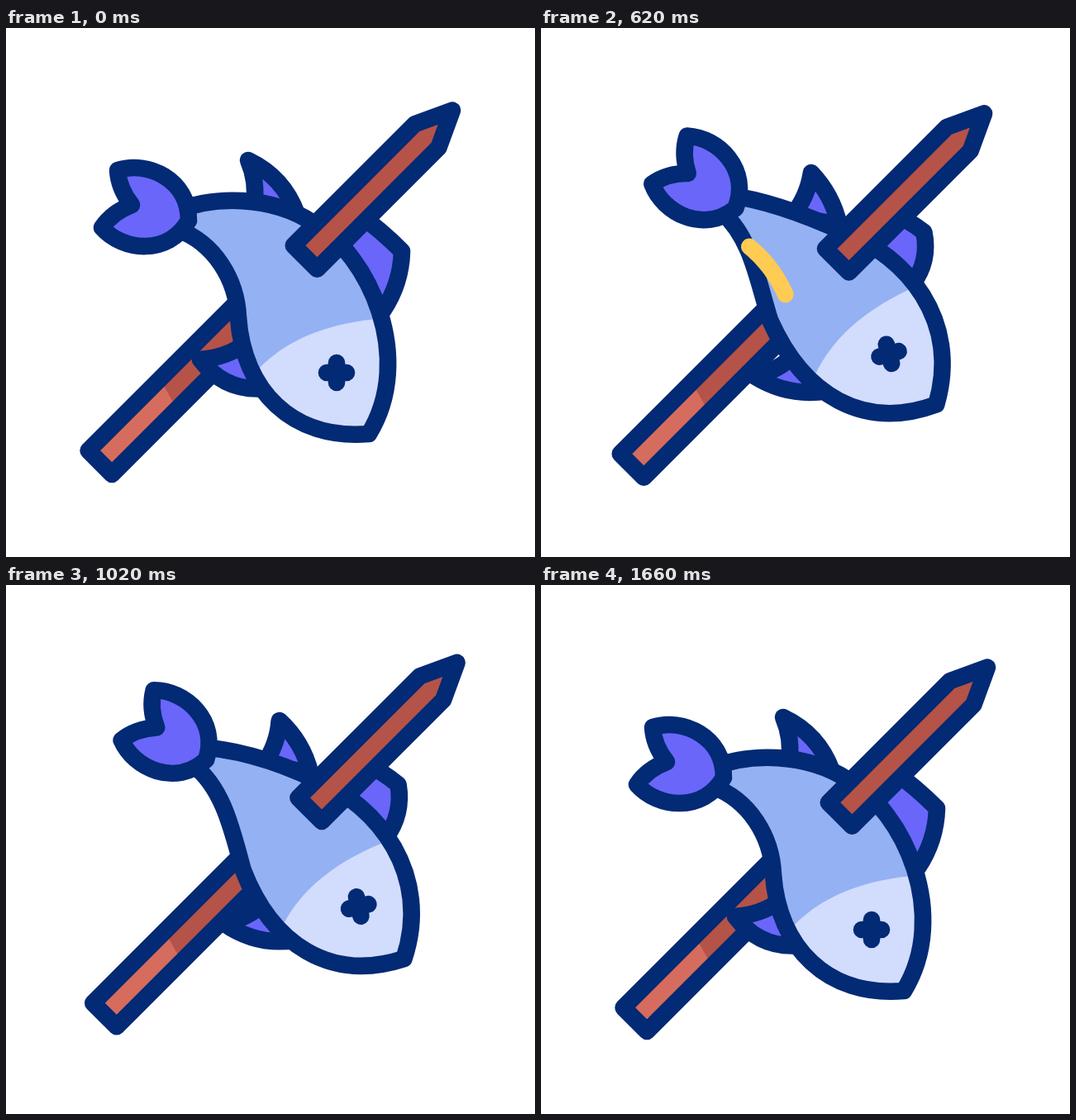
An HTML page with a canvas that plays this animation: 640x640 px, repeating every 2.4 s.

```html
<!DOCTYPE html>
<html lang="en">
<head>
<meta charset="utf-8">
<title>Fish on a skewer</title>
<style>
html, body { margin: 0; width: 100%; height: 100%; overflow: hidden; background: #fff; }
canvas { display: block; width: 640px; height: 640px; }
</style>
</head>
<body>
<canvas id="stage" width="640" height="640"></canvas>
<script>
const ctx = document.getElementById('stage').getContext('2d');
const LOOP = 2400, SWING = 48, LINE = 20.6;
const NAVY = '#032a74', BLUE = '#94b1f3', PALE = '#d2dcfd', VIOLET = '#6a66f9',
  WOOD = '#d66c5e', WOOD_DARK = '#b55348', YELLOW = '#ffcb52';

const clamp = v => Math.max(0, Math.min(1, v));
const ease = v => { v = clamp(v); return v * v * (3 - 2 * v); };
const mix = (a, b, p) => a + (b - a) * p;
const mixPt = (a, b, p) => [mix(a[0], b[0], p), mix(a[1], b[1], p)];

// Time, skewer shift, bend of the fish
const KEYS = [[0, 0, 0], [400, -1, 1], [866.7, 1, 0], [1200, -0.985, 1.03], [1666.7, 0, 0]];

function pose(t) {
  let i = 0;
  while (i < KEYS.length - 2 && t >= KEYS[i + 1][0]) i++;
  const [t0, s0, b0] = KEYS[i], [t1, s1, b1] = KEYS[i + 1];
  const e = ease((t - t0) / (t1 - t0));
  return { shift: mix(s0, s1, e) * SWING, bend: mix(b0, b1, e) };
}

// A bone moves from a to b and turns while the fish bends;
// the result places points given relative to it.
function bone(a, b, turn, p) {
  const [x, y] = mixPt(a, b, p), c = Math.cos(turn * p), s = Math.sin(turn * p);
  return (dx, dy) => [x + dx * c - dy * s, y + dx * s + dy * c];
}

// Control point of an arc from a to b, pushed sideways by bulge
function bow(a, b, bulge) {
  const dx = b[0] - a[0], dy = b[1] - a[1], k = bulge / Math.hypot(dx, dy);
  return [(a[0] + b[0]) / 2 - dy * k, (a[1] + b[1]) / 2 + dx * k];
}

const arcTo = (a, b, bulge) => ctx.quadraticCurveTo(...bow(a, b, bulge), ...b);
const cubicTo = (a, b, c) => ctx.bezierCurveTo(...a, ...b, ...c);

function paint(fill, line = NAVY) {
  if (fill) {
    ctx.fillStyle = fill;
    ctx.fill();
  }
  if (line) {
    ctx.strokeStyle = line;
    ctx.stroke();
  }
}

function fin(from, tip, to, bulge1, bulge2, root) {
  ctx.beginPath();
  ctx.moveTo(...from);
  arcTo(from, tip, bulge1);
  arcTo(tip, to, bulge2);
  if (root) ctx.lineTo(...root);
  ctx.closePath();
  paint(VIOLET);
}

function fins(p) {
  const at = (x, y, dx, dy) => [x + dx * p, y + dy * p];
  fin(at(290, 382, 42, 14), at(235, 401, 51, 31), at(314, 436, 66, -1), -8, mix(24, 10, p));
  fin(at(300, 215, 13, 17), at(293, 160, 70, 21), at(352, 225, 23, 17), 8, mix(-18, -3, p));
  fin(at(425, 224, 1, -10), at(479, 270, -22, -50), at(456, 342, -6, -65), -3, mix(-11, -18, p), [395, 290]);
}

function body(p) {
  const head = bone([400, 417], [446, 368], -0.5, p);
  const gill = bone([400, 417], [446, 368], -0.64, p);
  const nape = bone([372, 236], [372, 251], -0.27, p);
  const vent = bone([281, 350], [281, 350], -0.5, p);
  const rump = bone([221, 233], [255, 198], 0.67, p);

  const outline = new Path2D();
  const seg = (a, b, c) => outline.bezierCurveTo(...a, ...b, ...c);
  outline.moveTo(...rump(-16, -11));
  seg([250 + 30 * p, 203], nape(-52, -34), nape(0, 0));
  seg(nape(68, 38), head(95, -17), head(39, 74));
  seg(head(-54, 82), head(-113, 21), vent(0, 0));
  seg(vent(-2, -46), rump(31, 27), rump(-13, 11));
  outline.closePath();

  ctx.save();
  ctx.clip(outline);
  ctx.fillStyle = BLUE;
  ctx.fillRect(0, 0, 640, 640);
  ctx.beginPath();
  ctx.moveTo(...gill(-104, 6));
  cubicTo(gill(-65, -42), gill(-5, -62), gill(62, -66));
  for (const corner of [[200, -66], [200, 200], [-180, 200]]) ctx.lineTo(...gill(...corner));
  paint(PALE, null);
  ctx.restore();
  ctx.strokeStyle = NAVY;
  ctx.stroke(outline);
}

// Two mirrored lobes
function tail(p) {
  ctx.save();
  ctx.translate(...mixPt([221, 233], [255, 198], p));
  ctx.rotate(3.41 + 0.67 * p);
  ctx.beginPath();
  for (const s of [1, -1]) {
    ctx.moveTo(0, 0);
    ctx.bezierCurveTo(13, 48 * s, 67, 57 * s, 99, 36 * s);
    ctx.bezierCurveTo(94, 21 * s, 84, 9 * s, 71.5, 0);
  }
  paint(VIOLET);
  ctx.restore();
}

function eye(p) {
  ctx.save();
  ctx.translate(...mixPt([400, 417], [446, 368], p));
  ctx.rotate(-0.5 * p);
  ctx.beginPath();
  for (let i = 0; i < 4; i++) {
    ctx.moveTo(0, 0);
    ctx.lineTo(0, 12);
    ctx.rotate(Math.PI / 2);
  }
  paint(null);
  ctx.restore();
}

// Skewer pieces lie along their own x axis
function skewer(drawPiece) {
  ctx.save();
  ctx.translate(320, 319.5);
  ctx.rotate(-Math.PI / 4);
  drawPiece(20.2);
  ctx.restore();
}

function lowerPiece(r) {
  ctx.fillStyle = WOOD;
  ctx.fillRect(-291.5, -r, 150, 2 * r);
  ctx.beginPath();
  ctx.moveTo(0, -r);
  ctx.lineTo(-169, -r);
  ctx.lineTo(-180, r);
  ctx.lineTo(0, r);
  paint(WOOD_DARK, null);
  ctx.beginPath();
  ctx.rect(-291.5, -r, 291.5, 2 * r);
  paint(null);
}

function upperPiece(r) {
  ctx.beginPath();
  ctx.moveTo(59.5, r);
  ctx.lineTo(59.5, -r);
  ctx.lineTo(267.5, -r);
  ctx.lineTo(311, 0);
  ctx.lineTo(267.5, r);
  ctx.closePath();
  paint(WOOD_DARK);
}

// Flung drops: start time, path ends, bulge
const DROPS = [
  [507, [296, 323], [210, 240], 24],
  [644, [481, 288], [601, 328], -24],
  [1107, [344, 222], [318, 108], 12],
  [1173, [303, 468], [373, 550], -12]
];

function drop(t, [start, a, b, bulge]) {
  const front = ease((t - start) / 200), back = ease((t - start - 105) / 200);
  if (front - back < 0.005) return;
  const c = bow(a, b, bulge);
  ctx.beginPath();
  for (let i = 0; i <= 24; i++) {
    const u = mix(back, front, i / 24);
    ctx.lineTo(...mixPt(mixPt(a, c, u), mixPt(c, b, u), u));
  }
  ctx.lineWidth = 20;
  paint(null, YELLOW);
}

function draw(t) {
  const { shift, bend } = pose(t);
  ctx.fillStyle = '#fff';
  ctx.fillRect(0, 0, 640, 640);
  ctx.lineWidth = LINE;
  ctx.lineCap = ctx.lineJoin = 'round';
  ctx.save();
  ctx.translate(shift, -shift);
  skewer(lowerPiece);
  fins(bend);
  body(bend);
  tail(bend);
  eye(bend);
  skewer(upperPiece);
  ctx.restore();
  DROPS.forEach(d => drop(t, d));
}

const begin = performance.now();
function tick() {
  draw((performance.now() - begin) % LOOP);
  requestAnimationFrame(tick);
}
tick();
</script>
</body>
</html>
```
